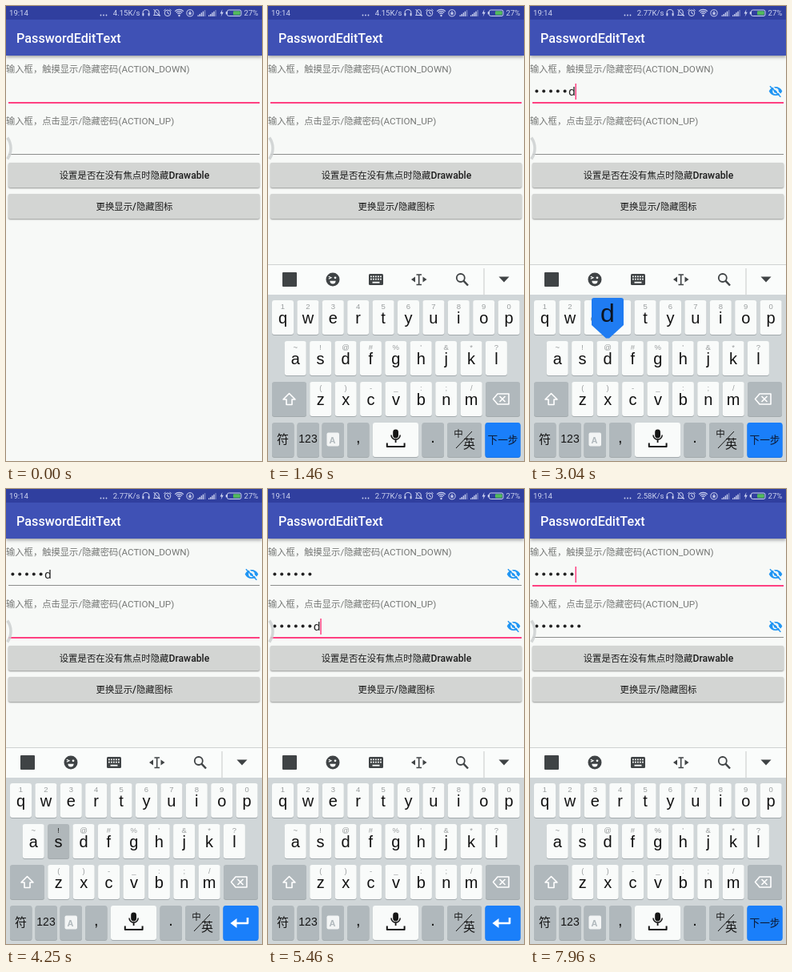
An HTML page with a canvas that plays this animation: 320 by 569 pixels, repeating every 8 s.

```html
<!DOCTYPE html>
<html lang="zh-CN">
<head>
<meta charset="utf-8">
<title>PasswordEditText</title>
<style>
html, body { margin: 0; width: 100%; height: 100%; overflow: hidden; background: #f7f9f7; }
canvas { display: block; width: 320px; height: 569px; }
</style>
</head>
<body>
<canvas id="stage"></canvas>
<script>
const W = 320, H = 569, LOOP = 8000;
const canvas = document.getElementById('stage');
const c = canvas.getContext('2d');
const dpr = window.devicePixelRatio || 1;
canvas.width = W * dpr;
canvas.height = H * dpr;

const CJK = '"Noto Sans CJK SC", "Noto Sans CJK", sans-serif';
const LATIN = 'Roboto, sans-serif';
const KEYFONT = '"Liberation Sans", Arial, sans-serif';
const MONO = '"Noto Sans Mono", "DejaVu Sans Mono", monospace';
const PINK = '#ff4081', DARK = '#3f4345', STATUS = '#cdd3f0';
const PITCH = 8.8;

// Typing: one letter per time in each field
const fields = [
  { y: 120, word: 'asdasd', times: [2100, 2290, 2480, 2660, 2840, 3010] },
  { y: 185, word: 'sdfjdsd', times: [4300, 4520, 4690, 4830, 4930, 5110, 5290] }
];
const SWITCH = 3500, RETURN = 7500;
const SLIDE = { start: 993, length: 300, height: 246 };

function box(x, y, w, h, color, r = 0) {
  c.fillStyle = color;
  c.beginPath();
  c.roundRect(x, y, w, h, r);
  c.fill();
}

function trace(points) {
  c.beginPath();
  points.forEach(([x, y], i) => i ? c.lineTo(x, y) : c.moveTo(x, y));
}

function shape(points, color) {
  trace(points);
  c.fillStyle = color;
  c.fill();
}

function line(points, color, width = 1) {
  trace(points);
  c.strokeStyle = color;
  c.lineWidth = width;
  c.stroke();
}

function arc(x, y, r, color, width, from = 0, to = Math.PI * 2) {
  c.beginPath();
  c.arc(x, y, r, from, to);
  if (width) {
    c.strokeStyle = color;
    c.lineWidth = width;
    c.stroke();
  } else {
    c.fillStyle = color;
    c.fill();
  }
}

function text(s, x, y, font, color, align = 'left') {
  c.font = font;
  c.fillStyle = color;
  c.textAlign = align;
  c.fillText(s, x, y);
}

// Chinese and Latin runs with their own sizes
function mixed(s, x, y, cjk, latin, weight, color, centered) {
  const runs = s.match(/[\u4e00-\u9fff\uff0c]+|[^\u4e00-\u9fff\uff0c]+/g).map(run => {
    const han = run >= '\u4e00';
    const font = `${weight} ${han ? cjk : latin}px ${han ? CJK : LATIN}`;
    c.font = font;
    return { run, font, width: c.measureText(run).width };
  });
  if (centered) x -= runs.reduce((sum, r) => sum + r.width, 0) / 2;
  for (const r of runs) {
    text(r.run, x, y, r.font, color);
    x += r.width;
  }
}

function signal(x) {
  for (let i = 0; i < 5; i++) {
    const h = 1.5 + i * 1.6;
    box(x + i * 2.1, 13 - h, 1.4, h, i < 4 ? STATUS : '#7580c0');
  }
}

function statusBar(t) {
  const speed = t < 1900 ? '4.15' : t < 5900 ? '2.77' : '2.58';
  box(0, 0, W, 17, '#303f9f');
  const font = '9.6px ' + LATIN;
  text('19:14', 4, 12.3, font, STATUS);
  for (let i = 0; i < 3; i++) arc(118.5 + i * 3.5, 11.5, 0.9, STATUS);
  text(speed + 'K/s', 133.8, 12.3, font, STATUS);

  // headphones
  arc(175, 8.5, 4, STATUS, 1.1, Math.PI, 0);
  box(170.4, 8.5, 2, 4, STATUS, 1);
  box(177.6, 8.5, 2, 4, STATUS, 1);
  // muted bell
  arc(188.5, 7.3, 2.7, STATUS, 1, Math.PI, 0);
  line([[185.8, 7], [185.8, 10.5], [184.5, 11.5], [192.5, 11.5], [191.2, 10.5], [191.2, 7]], STATUS);
  line([[184.5, 4], [192.5, 13]], STATUS);
  // alarm
  arc(202, 8.8, 3.8, STATUS, 1);
  line([[202, 6.5], [202, 9], [204, 10]], STATUS);
  line([[197.3, 5.8], [199.5, 4]], STATUS);
  line([[204.5, 4], [206.7, 5.8]], STATUS);
  // wifi
  for (const r of [3, 5.3, 7.6]) arc(216.5, 12, r, STATUS, 1.2, -2.35, -0.79);
  arc(216.5, 12, 1.2, STATUS);
  // rotation lock
  arc(230, 8.8, 4.1, STATUS, 1);
  box(228.4, 8.2, 3.2, 2.6, STATUS);
  arc(230, 8, 1.1, STATUS, 0.8, Math.PI, 0);

  signal(239.5);
  signal(253);
  shape([[270.5, 4], [267.6, 9.5], [269.6, 9.5], [268.6, 13.5], [271.8, 7.8], [269.8, 7.8]], STATUS);
  // battery, filled from the right
  c.strokeStyle = STATUS;
  c.lineWidth = 1;
  c.beginPath();
  c.roundRect(276.5, 5, 17.5, 7.5, 2);
  c.stroke();
  box(274.7, 7.2, 1.4, 3.2, STATUS);
  box(284, 6.2, 8.8, 5.1, '#52b95c', 1);
  text('27%', 297.5, 12.3, font, STATUS);
}

function appBar() {
  c.save();
  c.shadowColor = 'rgba(0,0,0,.35)';
  c.shadowBlur = 4 * dpr;
  c.shadowOffsetY = 1.5 * dpr;
  box(0, 16, W, 46, '#3f51b5');
  c.restore();
  text('PasswordEditText', 13, 46, '500 16.2px ' + LATIN, '#fff');
}

function button(y, label) {
  c.save();
  c.shadowColor = 'rgba(0,0,0,.4)';
  c.shadowBlur = 2 * dpr;
  c.shadowOffsetY = dpr;
  box(3, y, 314, 31, '#d3d5d3', 2);
  c.restore();
  mixed(label, 160.5, y + 20, 11.4, 12.2, 500, '#1c1c1c', true);
}

function eye(x, y) {
  const blue = '#2196f3';
  c.fillStyle = blue;
  c.beginPath();
  c.moveTo(x - 8.3, y);
  c.bezierCurveTo(x - 5, y - 7.4, x + 5, y - 7.4, x + 8.3, y);
  c.bezierCurveTo(x + 5, y + 7.4, x - 5, y + 7.4, x - 8.3, y);
  c.fill();
  arc(x, y, 3, '#f7f9f7', 1.5);
  line([[x - 5.5, y - 7.7], [x + 8, y + 5.8]], '#f7f9f7', 1.5);
  line([[x - 7.1, y - 6.3], [x + 6.4, y + 7.2]], blue, 1.5);
}

function field(f, focused, focusTime, t) {
  const count = f.times.filter(time => time <= t).length;
  const last = count ? f.times[count - 1] : -Infinity;
  const center = f.y - 13.5, base = f.y - 8;

  if (focused) box(3, f.y, 314, 2, PINK);
  else box(3, f.y, 314, 1, '#8b8d8b');

  for (let i = 0; i < count; i++) {
    const x = 4 + (i + 0.5) * PITCH;
    if (i === count - 1 && t - last < 1500)
      text(f.word[i], x, base, '14.7px ' + MONO, '#222', 'center');
    else arc(x, center, 2, '#222');
  }
  if (count) eye(307, center);

  // The caret restarts its blink on focus and on each letter
  const since = t - Math.max(last, focusTime);
  if (focused && since % 1000 < 500) box(4 + count * PITCH - 0.3, f.y - 23, 1.5, 20, PINK);
}

function key(x, y, w, color, edge = '#a3aaad') {
  box(x, y + 1, w, 43, edge, 3);
  box(x, y, w, 43, color, 3);
}

const rows = [
  { keys: 'qwertyuiop', hints: '1234567890', x: 18.5, y: 368 },
  { keys: 'asdfghjkl', hints: "~!@#%'&*?", x: 34.2, y: 419 },
  { keys: 'zxcvbnm', hints: '()-_:;/', x: 65.8, y: 470 }
];
const STEP = 31.4;

function letters(pressed) {
  for (const row of rows) {
    [...row.keys].forEach((ch, i) => {
      const x = row.x + i * STEP, down = ch === pressed;
      key(x - 13.5, row.y, 27, down ? '#b0b7ba' : '#f9fbfa');
      text(row.hints[i], x, row.y + 11, '9.5px ' + KEYFONT, down ? '#222' : '#9a9e9f', 'center');
      text(ch, x, row.y + 29, '20px ' + KEYFONT, '#111', 'center');
    });
  }
}

function popup(ch) {
  const row = rows.find(r => r.keys.includes(ch));
  const x = row.x + row.keys.indexOf(ch) * STEP, y = row.y - 54;
  box(x - 20, y, 40, 34, '#1f7cf2', 3);
  shape([[x - 20, y + 31], [x + 20, y + 31], [x + 20, y + 34], [x + 2, y + 50.5],
    [x - 2, y + 50.5], [x - 20, y + 34]], '#1f7cf2');
  text(ch, x, y + 30, '32px ' + KEYFONT, '#0c1420', 'center');
}

function toolbar() {
  const paper = '#fafcfb';
  box(0, 323, W, 38, paper);
  box(0, 323, W, 1, '#cfd2d2');
  box(18, 333, 18, 18, DARK, 1);
  // smiley
  arc(81, 342, 8.5, DARK);
  line([[75.8, 338.2], [79, 339.8], [75.8, 341.2]], paper, 1.2);
  arc(84, 339.8, 1.4, paper);
  arc(81, 343.8, 3.6, paper, 0, 0, Math.PI);
  // keyboard
  box(126, 335, 18, 14, DARK, 1.5);
  for (let j = 0; j < 2; j++)
    for (let i = 0; i < 5; i++) box(128 + i * 3, 337.5 + j * 3.2, 1.8, 1.8, paper);
  box(130.5, 344.8, 9, 1.8, paper);
  // text cursor
  line([[185.5, 336], [192, 336]], DARK, 1.5);
  line([[185.5, 348.5], [192, 348.5]], DARK, 1.5);
  line([[188.7, 336], [188.7, 348.5]], DARK, 1.6);
  shape([[179, 342], [184, 338.5], [184, 345.5]], DARK);
  shape([[198.5, 342], [193.5, 338.5], [193.5, 345.5]], DARK);
  // search
  arc(240.8, 340, 5, DARK, 1.8);
  line([[244.4, 343.6], [250, 349.5]], DARK, 2.4);
  box(269.5, 328, 1, 33, '#c5c9ca');
  shape([[288.5, 338.5], [301.5, 338.5], [295, 345.5]], DARK);
}

function bottomKeys(first) {
  const gray = '#b0b8bc', ink = '#151515', base = 547;
  // shift and delete
  key(5, 470, 43, gray);
  c.lineJoin = 'round';
  line([[26.5, 484.5], [34, 492], [30, 492], [30, 498.5], [23, 498.5], [23, 492], [19, 492],
    [26.5, 484.5], [34, 492]], '#fff', 1.6);
  key(272, 470, 43, gray);
  line([[281.5, 491.5], [287, 485], [301, 485], [301, 498], [287, 498], [281.5, 491.5], [287, 485]], '#fff', 1.6);
  line([[289.5, 488], [296.5, 495]], '#fff', 1.6);
  line([[296.5, 488], [289.5, 495]], '#fff', 1.6);

  for (const x of [5, 36.5, 67.5, 99, 192.5]) key(x, 521, 27.5, gray);
  text('符', 18.5, base, '15px ' + CJK, ink, 'center');
  text('123', 50, base - 1, '14px ' + KEYFONT, ink, 'center');
  box(73.5, 533.5, 15.5, 17, '#f3f5f5', 2);
  text('A', 80.5, 546.5, 'bold 11px ' + KEYFONT, gray, 'center');
  text(',', 112.7, base - 1, '20px ' + KEYFONT, ink, 'center');
  text('.', 206, base - 1, '20px ' + KEYFONT, ink, 'center');

  // microphone
  key(131, 521, 57, '#f9fbfa');
  box(156.2, 529.5, 6.8, 11, ink, 3.4);
  arc(159.6, 536.5, 5.6, ink, 1.5, 0, Math.PI);
  line([[159.6, 542], [159.6, 546]], ink, 1.8);
  line([[148.8, 546.5], [148.8, 551], [170.6, 551], [170.6, 546.5]], ink, 2);

  key(224, 521, 43, gray);
  text('中', 238, 539, '11.5px ' + CJK, ink, 'center');
  line([[235, 553], [255, 532]], ink);
  text('英', 251.5, 553, '15px ' + CJK, ink, 'center');

  key(271.5, 521, 44, '#1a7ffa', '#1a74e4');
  if (first) text('下一步', 293.5, 546.5, '12.7px ' + CJK, '#0c1730', 'center');
  else {
    line([[302, 536], [302, 543], [287, 543]], '#fff', 2.6);
    shape([[280.5, 543], [288.5, 537], [288.5, 549]], '#fff');
  }
  c.lineJoin = 'miter';
}

function keyboard(t, first) {
  const p = Math.min(1, (t - SLIDE.start) / SLIDE.length);
  if (p <= 0) return;
  c.save();
  c.translate(0, SLIDE.height * (1 - p) ** 2);
  toolbar();
  box(0, 361, W, 208, '#d0d6d8');

  let pressed = '', shown = '';
  for (const f of fields) {
    f.times.forEach((time, i) => {
      const d = t - time;
      if (d >= -60 && d < -10) pressed = f.word[i];
      else if (d >= -10 && d < 90) shown = f.word[i];
    });
  }
  letters(pressed);
  bottomKeys(first);
  if (shown && !pressed) popup(shown);
  c.restore();
}

function draw(t) {
  const first = t < SWITCH || t >= RETURN;
  c.setTransform(dpr, 0, 0, dpr, 0, 0);
  box(0, 0, W, H, '#f7f9f7');
  appBar();
  statusBar(t);
  mixed('输入框，触摸显示/隐藏密码(ACTION_DOWN)', 0, 83, 11.3, 11.7, 400, '#757775');
  mixed('输入框，点击显示/隐藏密码(ACTION_UP)', 0, 148, 11.3, 11.7, 400, '#757775');
  field(fields[0], first, t >= RETURN ? RETURN : -520, t);
  field(fields[1], !first, SWITCH, t);
  button(196, '设置是否在没有焦点时隐藏Drawable');
  button(235, '更换显示/隐藏图标');
  arc(-17, 178, 23, 'rgba(205,208,208,.85)', 3.5, -0.62, 0.62);
  keyboard(t, first);
}

function tick(now) {
  draw(now % LOOP);
  requestAnimationFrame(tick);
}
requestAnimationFrame(tick);
</script>
</body>
</html>
```
